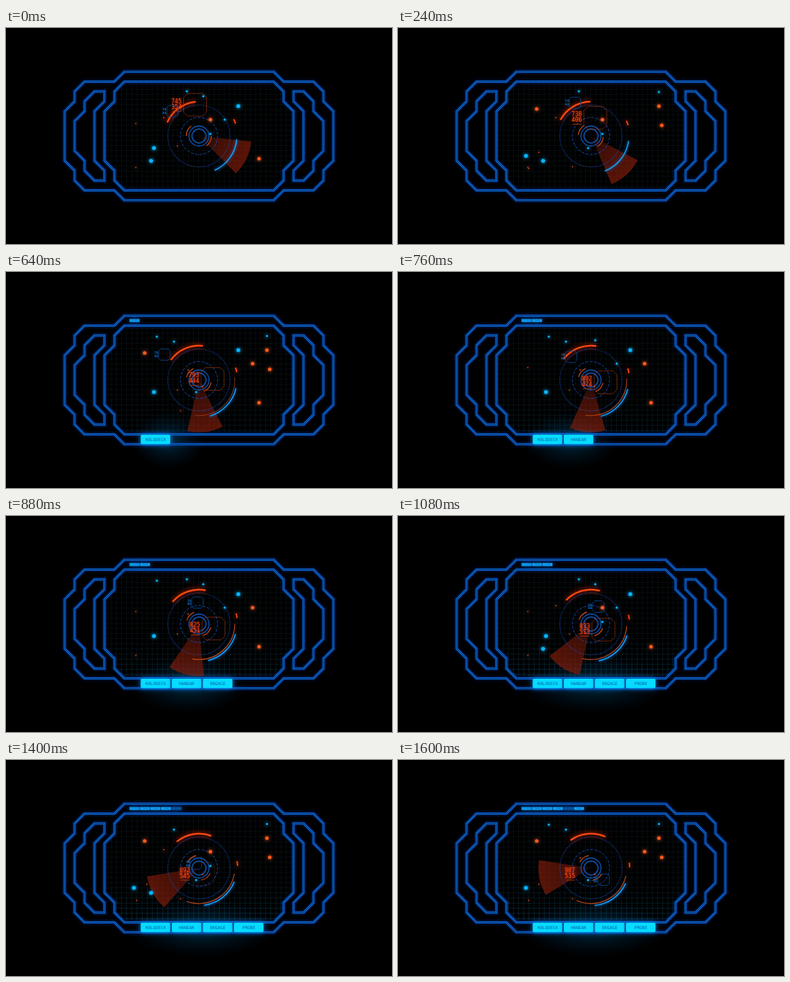
An HTML page with a canvas that plays this animation: 540 px wide and 304 px high, repeating every 1.64 s.

```html
<!DOCTYPE html>
<html lang="en">
<head>
<meta charset="utf-8">
<title>Radar console</title>
<style>
html, body { margin: 0; width: 100%; height: 100%; overflow: hidden; background: #000; }
canvas { display: block; width: 540px; height: 304px; }
</style>
</head>
<body>
<canvas id="stage" width="540" height="304"></canvas>
<script>
const ctx = document.getElementById('stage').getContext('2d');
const LOOP = 1640, STEP = 40, CX = 270, CY = 152, UNIT = 13.9;
const BLINK = 1040, PHASES = 8;
const ORANGE = '#ff4a12';
const rad = deg => deg * Math.PI / 180;
const clamp = v => Math.min(1, Math.max(0, v));
const flipX = pts => pts.map(([x, y]) => [2 * CX - x, y]);
const flipY = pts => pts.map(([x, y]) => [x, 2 * CY - y]);
const back = pts => [...pts].reverse();

// Repeatable noise in 0..1
function noise(n) {
  const v = Math.sin(n * 127.1 + 3.7) * 43758.5453;
  return v - Math.floor(v);
}

function outline(pts) {
  const path = new Path2D();
  pts.forEach(([x, y], i) => i ? path.lineTo(x, y) : path.moveTo(x, y));
  path.closePath();
  return path;
}

// Walk the unit grid by compass steps
function walk(x, y, steps) {
  const pts = [[x, y]];
  for (const step of steps.split(' ')) {
    if (step.includes('E')) x += UNIT;
    if (step.includes('W')) x -= UNIT;
    if (step.includes('S')) y += UNIT;
    if (step.includes('N')) y -= UNIT;
    pts.push([x, y]);
  }
  return pts;
}
function mirrored(corner) {
  const top = [...corner, ...back(flipX(corner))];
  return outline([...top, ...back(flipY(top))]);
}
const panel = mirrored(walk(137.8, 117.2, 'NE N NE'));
const bracketTop = walk(96, 131, 'NE N NE E S SW');
const bracket = [...bracketTop, ...back(flipY(bracketTop))];
const frames = [
  mirrored(walk(82, 117.2, 'NE N NE E E E NE')),
  panel, outline(bracket), outline(flipX(bracket))
];

// Blips: x, y, blink phase
const blips = [
  { color: '#08b4ff', radius: 2.8, points: [[179, 180, 0], [207, 169, 4], [325, 110, 4], [203, 187, 7]] },
  { color: '#08b4ff', radius: 1.6, points: [[365, 90, 1], [266, 169, 1], [235, 98, 2], [211, 91, 3],
    [276, 96, 5], [306, 129, 5], [253, 89, 6], [286, 149, 7]] },
  { color: '#ff5a1c', radius: 2.5, points: [[194, 114, 1], [365, 110, 1], [369, 137, 1], [345, 129, 3],
    [354, 184, 4], [286, 129, 7]] },
  { color: '#e04a1c', radius: .9, points: Array.from({ length: 9 }, (_, i) =>
    [180 + 120 * noise(i), 125 + 85 * noise(i + 40), i % PHASES]) }
];
const tagPath = [[233, 117], [253, 101], [220, 117], [290, 124], [256, 136], [292, 173]];

function along(path, k) {
  const place = k * (path.length - 1), i = Math.floor(place);
  return path[i].map((v, axis) => v + (path[i + 1][axis] - v) * (place - i));
}

function stroke(path, color, width) {
  ctx.strokeStyle = color;
  ctx.lineWidth = width;
  ctx.stroke(path);
}
function arc(r, from, span, color, width, dash = []) {
  const path = new Path2D();
  path.arc(CX, CY, r, rad(from), rad(from + span));
  ctx.setLineDash(dash);
  stroke(path, color, width);
  ctx.setLineDash([]);
}
function glowing(color, blur, draw) {
  ctx.save();
  ctx.shadowColor = color;
  ctx.shadowBlur = blur;
  draw();
  ctx.restore();
}
function drawText(text, x, y, size, color, weight = 'normal') {
  ctx.font = `${weight} ${size}px "DejaVu Sans Mono", monospace`;
  ctx.fillStyle = color;
  ctx.textAlign = 'center';
  ctx.textBaseline = 'middle';
  ctx.fillText(text, x, y);
}

function drawGrid(t) {
  ctx.save();
  ctx.clip(panel);
  ctx.beginPath();
  for (let x = 140; x < 402; x += 7.2) { ctx.moveTo(x, 79); ctx.lineTo(x, 226); }
  for (let y = 79; y < 228; y += 7.2) { ctx.moveTo(139, y); ctx.lineTo(401, y); }
  ctx.lineWidth = .7;
  ctx.strokeStyle = 'rgba(35,70,85,.25)';
  ctx.stroke();
  const light = ctx.createLinearGradient(0, 170, 0, 229);
  light.addColorStop(0, 'rgba(0,100,150,0)');
  light.addColorStop(1, `rgba(0,110,160,${.35 * clamp((t - 480) / 560)})`);
  ctx.strokeStyle = light;
  ctx.stroke();
  ctx.restore();
}

function drawFrames() {
  for (const path of frames) {
    stroke(path, 'rgba(0,50,170,.13)', 9);
    stroke(path, 'rgba(0,70,190,.2)', 5.5);
    stroke(path, '#0b69d8', 2.9);
    stroke(path, '#04306a', 1);
  }
}

function drawScanner(t) {
  const start = 6 + .0895 * t;
  const fill = ctx.createRadialGradient(CX, CY, 4, CX, CY, 74);
  fill.addColorStop(0, 'rgba(130,28,10,.15)');
  fill.addColorStop(.35, 'rgba(130,28,10,.5)');
  fill.addColorStop(1, 'rgba(140,30,10,.64)');
  ctx.fillStyle = fill;
  ctx.beginPath();
  ctx.moveTo(CX, CY);
  ctx.arc(CX, CY, 73.5, rad(start), rad(start + 39.5));
  ctx.fill();
}

function drawDial(t) {
  const turn = .018 * t;
  arc(43.5, 0, 360, '#1a48b0', 1.2, [1.1, 1.6]);
  arc(26, turn, 360, '#1549a8', 1, [4, 2]);
  arc(14, 0, 360, '#0d55b5', 1.3);
  arc(9.8, 0, 360, '#0d4a9c', 1.8);
  arc(17.8, 180 + turn, 52, '#d8501c', 1.1);
  arc(17.3, turn, 55, '#d8501c', 1.1);
  glowing('#ff3000', 7, () => {
    arc(48.4, 203.5 + .0189 * t, 61, ORANGE, 2.3);
    arc(54, .0113 * t - 26, 7, ORANGE, 1.8);
  });
  glowing('#0080ff', 4, () => arc(53, 5 + .0119 * t, 60.5, '#16a0f4', 1.6));
  ctx.globalAlpha = clamp((t - 440) / 360);
  arc(50, turn - 16, 101, '#c94a16', 1.1);
  ctx.globalAlpha = 1;
}

function drawBlips(t) {
  for (const { color, radius, points } of blips) {
    ctx.fillStyle = color;
    glowing(color, 5, () => {
      for (const [x, y, phase] of points) {
        const start = 50 + phase * BLINK / PHASES;
        if ((t - start + 2 * BLINK) % BLINK >= BLINK / 2) continue;
        ctx.beginPath();
        ctx.arc(x, y, radius, 0, 2 * Math.PI);
        ctx.fill();
      }
    });
  }
}

function drawTag(x, y, half, color) {
  const cut = half * .35;
  const right = [[cut - half, -half], [half - cut, -half], [half, cut - half], [half, half - cut]];
  const all = [...right, ...right.map(([a, b]) => [-a, -b])];
  stroke(outline(all.map(([a, b]) => [x + a, y + b])), color, .9);
}

function drawReadouts(t) {
  const x = 264.5 + 26 * Math.sin(Math.PI * t / LOOP);
  const y = 108 + 52 * Math.sin(Math.PI / 2 * clamp(t / 1050));
  const count = base => Math.round(base + .12 * t + 50 * noise(base + t / STEP));
  ctx.globalAlpha = .65 * clamp(1 - (t - 1120) / 480);
  drawTag(x, y, 16, '#b13a12');
  ctx.globalAlpha = 1;
  glowing('#ff2800', 3, () => {
    drawText(count(700), x - 26, y - 4.5, 8, ORANGE);
    drawText(count(340), x - 26, y + 3.5, 8, ORANGE);
  });
  ctx.fillStyle = '#9c3210';
  ctx.fillRect(x - 32, y + 8.6, 13, 1);

  const [bx, by] = along(tagPath, t / LOOP);
  drawTag(bx, by, 8, '#0b4588');
  drawText('78', bx - 11.5, by - 2, 4.6, '#1272d0', 'bold');
  drawText('88', bx - 11.5, by + 2.4, 4.6, '#1272d0', 'bold');
}

// Wide soft light spreading with the row of buttons
function drawHalo(t) {
  const spread = clamp((t - 480) / 560);
  if (!spread) return;
  const half = 30 + 76 * spread;
  ctx.save();
  ctx.translate(182 + half * .87, 237);
  ctx.scale(half / 40, 1);
  const halo = ctx.createRadialGradient(0, 0, 2, 0, 0, 40);
  halo.addColorStop(0, 'rgba(0,85,125,.5)');
  halo.addColorStop(.5, 'rgba(0,65,105,.24)');
  halo.addColorStop(1, 'rgba(0,45,90,0)');
  ctx.fillStyle = halo;
  ctx.fillRect(-40, -40, 80, 80);
  ctx.restore();
}

function drawButtons(t) {
  ['HOLODECK', 'HANGAR', 'ENGAGE', 'PROBE'].forEach((label, i) => {
    if (t < 520 + 160 * i) return;
    const x = 188.5 + 43.5 * i;
    ctx.fillStyle = '#06dcff';
    glowing('#008cff', 7, () => {
      ctx.beginPath();
      ctx.roundRect(x, 229, 41.2, 13.2, 1.8);
      ctx.fill();
    });
    drawText(label, x + 20.8, 236, 6, '#0560a8');
  });
}

function drawStatus(t) {
  ['SYSTEM', 'POWER', 'SCAN', 'LINK', 'CORE', 'SYNC'].forEach((label, i) => {
    if (t < 520 + 200 * i) return;
    const x = 172.8 + 14.7 * i;
    ctx.fillStyle = label === 'CORE' ? '#07519a' : '#12a2f6';
    glowing('#0058c8', 7, () => ctx.fillRect(x, 66.2, 14, 4.2));
    drawText(label, x + 7, 68.5, 3, '#0659a0');
  });
}

function draw(t) {
  ctx.fillStyle = '#000';
  ctx.fillRect(0, 0, 540, 304);
  drawHalo(t);
  drawGrid(t);
  drawFrames();
  drawScanner(t);
  drawDial(t);
  drawReadouts(t);
  drawBlips(t);
  drawButtons(t);
  drawStatus(t);
}

const begin = performance.now();
function tick() {
  const t = (performance.now() - begin) % LOOP;
  draw(Math.floor(t / STEP) * STEP);
  requestAnimationFrame(tick);
}
tick();
</script>
</body>
</html>
```
